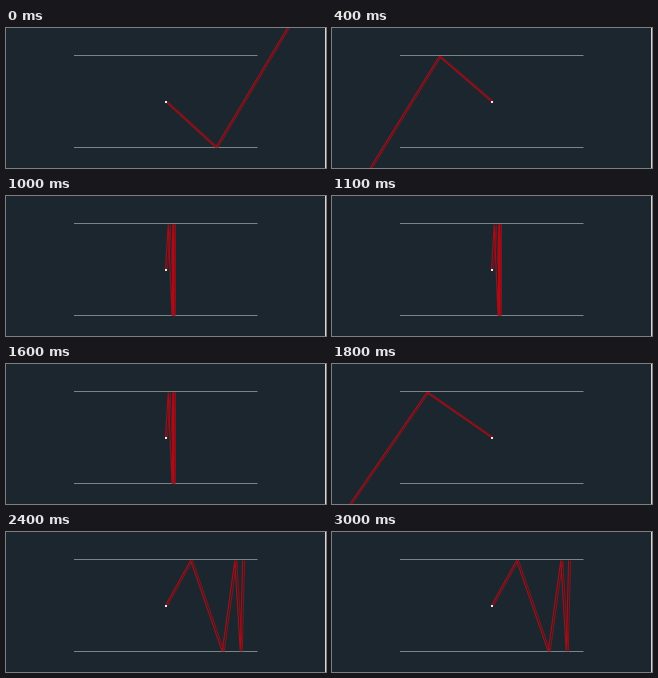
Animation of 320x140 px, one loop 3.1 s. Source, as a matplotlib script:

```python
import matplotlib.pyplot as plt
from matplotlib.animation import FuncAnimation

W, H, DPI = 320, 140, 100
STEP_MS, FRAMES = 100, 31
TOP, BOTTOM = 27.5, 119.5
LEFT, RIGHT = 68, 251.5
SOURCE = (159.5, 73.5)
TWIN_SHIFT = 2.0
PX = 72 / DPI

# start frame, x of each bounce, first wall hit, point where the ray leaves
POSES = [
    (0, [209.8], BOTTOM, (282, -1)),
    (3, [107.2], TOP, (37.5, 141)),
    (10, [162.2, 166.0, 167.2, 166.9, 167.5], TOP, None),
    (18, [94.8], TOP, (17.3, 141)),
    (24, [184.6, 216.2, 228.8, 234.3, 236.6], TOP, None),
]


def ray_path(bounces, wall, leave):
    points = [SOURCE]
    for x in bounces:
        points.append((x, wall + (1 if wall == TOP else 0)))
        wall = TOP + BOTTOM - wall
    if leave:
        points.append(leave)
    return points


fig = plt.figure(figsize=(W / DPI, H / DPI), dpi=DPI, facecolor="#1c262e")
ax = fig.add_axes([0, 0, 1, 1])
ax.set_xlim(0, W)
ax.set_ylim(H, 0)
ax.axis("off")


def add_line(xs, ys, color, width=1.0):
    line, = ax.plot(xs, ys, color=color, lw=width * PX, snap=False,
                    solid_capstyle="butt", solid_joinstyle="bevel")
    return line


for y in (TOP, BOTTOM):
    add_line([LEFT, RIGHT], [y, y], "#7b8387")
add_line([W - 0.5] * 2, [0, H], "#d8d6d2")

twin = add_line([], [], "#8e0f18")
ray = add_line([], [], "#a80d17", 1.1)
ax.plot(*SOURCE, "s", color="#f2eeee", ms=2.6 * PX, mew=0, zorder=5)


def draw(frame):
    pose = [p for p in POSES if p[0] <= frame][-1]
    xs, ys = zip(*ray_path(*pose[1:]))
    ray.set_data(xs, ys)
    twin.set_data([x + TWIN_SHIFT for x in xs], ys)
    return twin, ray


anim = FuncAnimation(fig, draw, frames=FRAMES, interval=STEP_MS,
                     repeat=True, repeat_delay=0)
plt.show()
```
